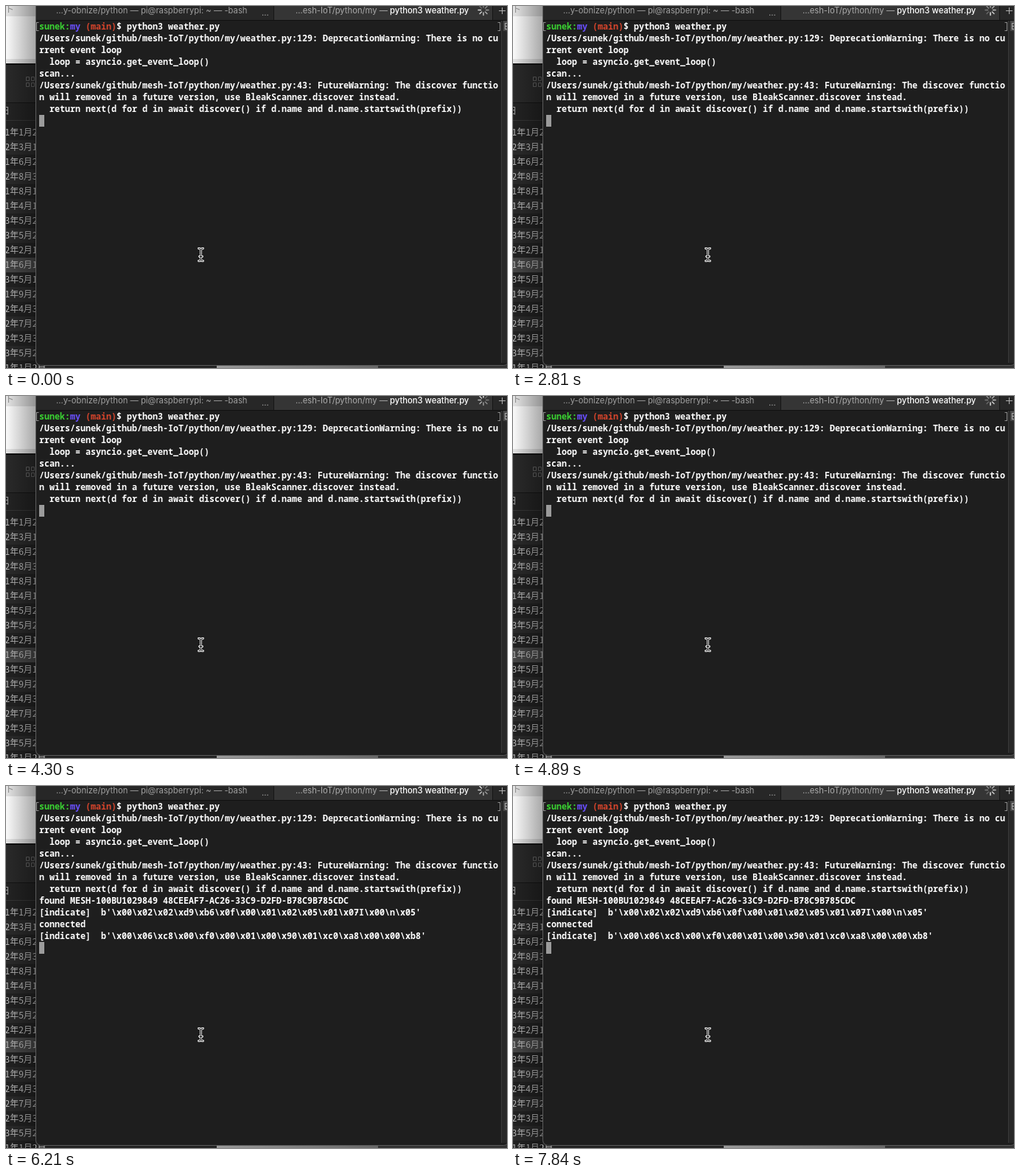
An HTML page with a canvas for the animation above (7.99 s loop, 680x492 px).

```html
<!DOCTYPE html>
<html lang="en">
<head>
<meta charset="utf-8">
<title>Weather script in a terminal</title>
<style>
  html, body { margin: 0; width: 100%; height: 100%; overflow: hidden; background: #1e1e1e; }
  canvas { display: block; }
</style>
</head>
<body>
<canvas id="stage" width="680" height="492"></canvas>
<script>
const canvas = document.getElementById('stage');
const ctx = canvas.getContext('2d');
const W = canvas.width, H = canvas.height;
const LOOP = 7990, TICK = 147.6;
const CELL = 7, LINE = 16, LEFT = 45, TOP = 20;
const PANEL = 40, ROW = 20;
const MONO = '600 11.667px "Noto Sans Mono", monospace';
const UI = '11.25px Inter, sans-serif';
const CJK = '500 12px "Noto Sans CJK JP", "Noto Sans CJK", sans-serif';

// Each block of output appears at once at its time in ms.
const script = '/Users/sunek/github/mesh-IoT/python/my/weather.py';
const output = [
  { at: 0, text: `${script}:129: DeprecationWarning: There is no cu
rrent event loop
  loop = asyncio.get_event_loop()
scan...
${script}:43: FutureWarning: The discover functio
n will removed in a future version, use BleakScanner.discover instead.
  return next(d for d in await discover() if d.name and d.name.startswith(prefix))` },
  { at: 5030, text: 'found MESH-100BU1029849 48CEEAF7-AC26-33C9-D2FD-B78C9B785CDC' },
  { at: 5900, text: String.raw`[indicate]  b'\x00\x02\x02\xd9\xb6\x0f\x00\x01\x02\x05\x01\x07I\x00\n\x05'
connected` },
  { at: 6050, text: String.raw`[indicate]  b'\x00\x06\xc8\x00\xf0\x00\x01\x00\x90\x01\xc0\xa8\x00\x00\xb8'` }
];

function rect(fill, x, y, w, h) {
  ctx.fillStyle = fill;
  ctx.fillRect(x, y, w, h);
}

function label(text, x, y, color, font = UI) {
  ctx.font = font;
  ctx.fillStyle = color;
  ctx.fillText(text, x, y);
}

function stroke(color, width, trace) {
  ctx.strokeStyle = color;
  ctx.lineWidth = width;
  ctx.beginPath();
  trace();
  ctx.stroke();
}

function segment(x1, y1, x2, y2) {
  ctx.moveTo(x1, y1);
  ctx.lineTo(x2, y2);
}

function fade(x1, x2, from, to) {
  const gradient = ctx.createLinearGradient(x1, 0, x2, 0);
  gradient.addColorStop(0, from);
  gradient.addColorStop(1, to);
  return gradient;
}

function seeded(seed) {
  return () => (seed = seed * 16807 % 2147483647) / 2147483647;
}

// Prints on the character grid; D and 7 carry a crossbar in this typeface.
function print(text, row, col = 0, color = '#fff') {
  const y = TOP + row * LINE;
  [...text].forEach((char, i) => {
    const x = LEFT + (col + i) * CELL;
    label(char, x, y + 12, color, MONO);
    if (char === 'D') rect(color, x, y + 7, 3, 1);
    if (char === '7') rect(color, x + 2, y + 7, 4, 1);
  });
}

function drawFileList() {
  const random = seeded(23);
  const digit = max => 1 + Math.floor(random() * max);
  rect('#2b2b2b', 0, 80, PANEL, 51);
  stroke('#666', 1, () => {
    for (let i = 0; i < 4; i++) ctx.rect(27.5 + i % 2 * 7, 96.5 + (i >> 1) * 8, 4, 5);
  });
  rect('#151515', 0, 131, PANEL, 1);
  label('日', -7, 147, '#a8a8a8', CJK);
  rect('#383838', 0, 155, PANEL, 1);
  for (let i = 0, y = 162; y < H; i++, y += ROW) {
    rect(i === 9 ? '#484848' : i % 2 ? '#2c2c2c' : '#232323', 0, y, 285, ROW);
    label(`${digit(3)}年${digit(9)}月${digit(3)}日`, -1.5, y + 14, '#c0c0c0', CJK);
  }
  rect(fade(0, PANEL, 'rgba(0,0,0,0.03)', 'rgba(0,0,0,0.35)'), 0, 80, PANEL, H - 80);
}

function drawBackground() {
  rect('#242424', 0, 0, W, H);
  rect(fade(0, PANEL, '#e4e4e4', '#949494'), 0, 0, PANEL, 78);
  rect(fade(0, PANEL, '#fafafa', '#a8a8a8'), 0, 14, PANEL, 58);
  label('ト', -1, 9, '#8c8c8c', CJK);
  rect('#111', 0, 78, PANEL, 2);
  drawFileList();
  rect(fade(286, 505, '#9a9a9a', '#666'), 286, 488, 219, 4);
  rect('#333', 505, 488, W - 505, 4);
}

function drawTabs() {
  rect('#272727', 41, 0, W - 41, 19);
  rect('#353535', 364, 0, 296, 19);
  rect('#111', 41, 19, W - 41, 1);
  for (const x of [363, 660]) rect('#161616', x, 0, 1, 19);
  label('…y-obnize/python — pi@raspberrypi: ~ — -bash', 68, 10, '#a0a0a0');
  label('…', 347, 13, '#a8a8a8');
  label('…esh-IoT/python/my —', 393, 10, '#ababab');
  label('python3 weather.py', 521, 10, '#fff', '500 ' + UI);
  stroke('#b0b0b0', 1, () => {
    segment(669, 6.5, 678, 6.5);
    segment(673.5, 2, 673.5, 11);
  });
}

function drawWindow() {
  ctx.beginPath();
  ctx.roundRect(40.5, -20, 642, 508.5, 7);
  ctx.fillStyle = '#1e1e1e';
  ctx.fill();
  stroke('#5c5c5c', 1, () => ctx.roundRect(40.5, -20, 642, 508.5, 7));
  rect('#282828', 672, 20, 8, 465);
  rect('#3a3a3a', 672, 20, 1, 465);
  rect('#484848', 675, 20, 5, 14);
  stroke('#aaa', 1, () => {
    for (let y = 23.5; y < 32; y += 4) segment(677, y, W, y);
    segment(677.5, 23, 677.5, 32);
  });
  drawTabs();
}

function drawSpinner(step) {
  ctx.lineCap = 'round';
  for (let i = 0; i < 8; i++) {
    const dx = Math.cos(i * Math.PI / 4), dy = Math.sin(i * Math.PI / 4);
    const age = (step - i + 800) % 8;
    stroke(`rgba(240,240,240,${0.9 - age * 0.09})`, 1.5, () =>
      segment(648 + dx * 3.5, 5.5 + dy * 3.5, 648 + dx * 7, 5.5 + dy * 7));
  }
  ctx.lineCap = 'butt';
}

function drawBracket(x, inward) {
  stroke('#8c8c8c', 1, () => {
    for (const y of [22.5, 33.5]) segment(x, y, x + inward * 3, y);
    segment(x, 22, x, 34);
  });
}

function drawTerminal(time) {
  drawBracket(41.5, 1);
  drawBracket(670.5, -1);
  print('sunek:', 0, 0, '#3ad232');
  print('my', 0, 6, '#6a50ff');
  print('(main)', 0, 9, '#d8452c');
  print('$ python3 weather.py', 0, 15);
  const lines = output.filter(block => time >= block.at).flatMap(block => block.text.split('\n'));
  lines.forEach((text, i) => print(text, i + 1));
  rect('#9b9b9b', LEFT, TOP + (lines.length + 1) * LINE, CELL, LINE);
}

function drawPointer() {
  const x = 264.5, y = 338;
  const beam = () => {
    for (const side of [-1, 1]) {
      for (const end of [-1, 1]) {
        ctx.moveTo(x + side * 3, y + end * 8.5);
        ctx.quadraticCurveTo(x, y + end * 8.5, x, y + end * 6);
      }
    }
    segment(x, y - 7, x, y + 7);
    segment(x - 2, y + 2.5, x + 2, y + 2.5);
  };
  ctx.lineCap = 'round';
  stroke('#f0f0f0', 2.8, beam);
  ctx.lineCap = 'butt';
  stroke('#111', 1, beam);
}

const origin = performance.now();

function render() {
  const time = (performance.now() - origin) % LOOP;
  const tick = Math.floor(time / TICK);
  drawBackground();
  drawWindow();
  drawSpinner(Math.floor(tick * TICK / 125) + 4);
  drawTerminal(time);
  drawPointer();
  requestAnimationFrame(render);
}

render();
</script>
</body>
</html>
```
